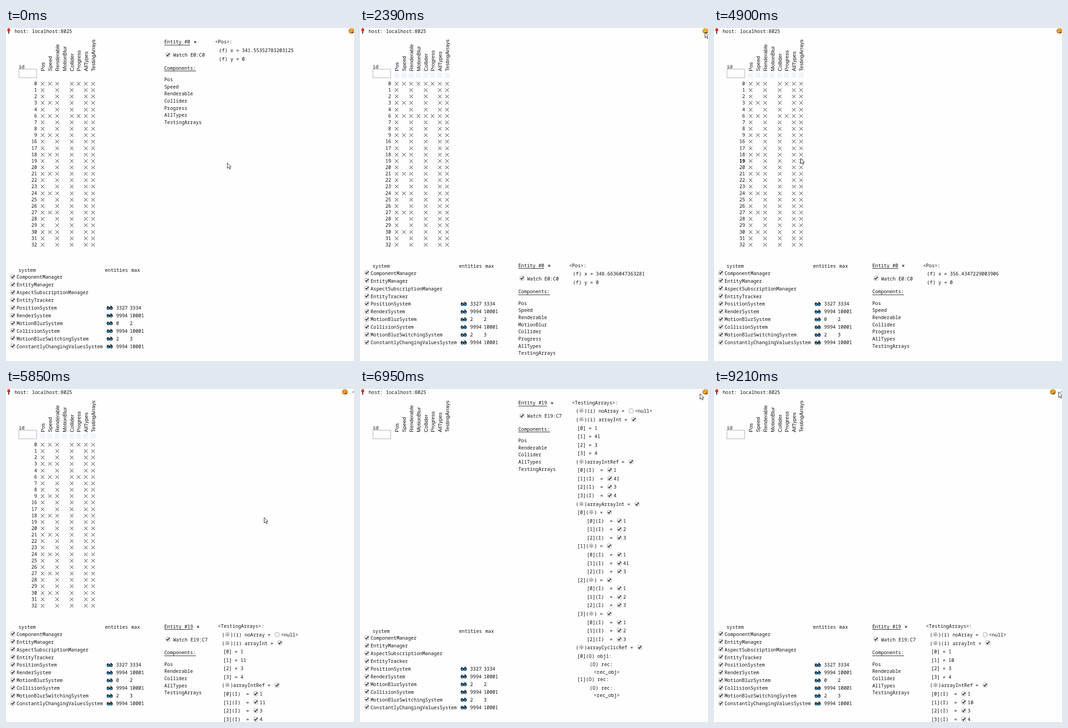
These frames come from a looping animation (765x732 px, 9.36 s). An HTML page with a canvas:

```html
<!DOCTYPE html>
<html lang="en">
<head>
<meta charset="utf-8">
<title>Entity inspector</title>
<style>
  html, body { margin: 0; width: 765px; height: 732px; overflow: hidden; background: #fefefe; }
  canvas { display: block; }
</style>
</head>
<body>
<canvas id="stage" width="765" height="732"></canvas>
<script>
const ctx = document.getElementById('stage').getContext('2d');
const LOOP = 9360;
const TICK = 78; // ms between refreshes
const CW = 6.325; // width of one monospace character
const MONO = '10.54px "Noto Sans Mono", monospace';
const MEDIUM = '500 ' + MONO;
const BOLD = '600 ' + MONO;
const SANS = '11.5px "Liberation Sans", Arial, sans-serif';
const CJK = '11.5px "Noto Sans CJK JP", "Noto Sans CJK", sans-serif';
const INK = '#111';

// Clicks and state changes
const TO_BOTTOM = 1390, PICK_ARRAYS = 4910, TO_SIDE = 6720, TO_BOTTOM_AGAIN = 8740;
const BLUR_OFF = 3560, BLUR_OFF_AGAIN = 8040;

// Key points: time, then values
const posKeys = [[0, 341.55352783203125], [1230, 345.27301025390625],
  [2390, 348.6636047363281], [3880, 353.2777099609375]];
const countKeys = [[5850, 111], [6950, 141], [9210, 210]];
const mouseKeys = [[120, 486, 296], [920, 757, 9], [3330, 758, 9], [3880, 242, 244], [4280, 190, 286],
  [4990, 190, 286], [5850, 567, 282], [6560, 747, 10], [7650, 747, 9], [8200, 757, 6]];

const columns = ['Pos', 'Speed', 'Renderable', 'MotionBlur', 'Collider', 'Progress', 'AllTypes', 'TestingArrays'];
const ids = Array.from({ length: 33 }, (_, i) => i).filter(i => i < 10 ? i !== 5 : i > 15);
const systems = [['ComponentManager'], ['EntityManager'], ['AspectSubscriptionManager'], ['EntityTracker'],
  ['PositionSystem', 3327, 3334], ['RenderSystem', 9994, 10001], ['MotionBlurSystem', 0, 2],
  ['CollisionSystem', 9994, 10001], ['MotionBlurSwitchingSystem', 2, 3],
  ['ConstantlyChangingValuesSystem', 9994, 10001]];

// Moves between key points in steps of about one tick, past the ends in a straight line
function interp(keys, t, axis = 1, ease = u => u) {
  let i = 0;
  while (i < keys.length - 2 && keys[i + 1][0] <= t) i++;
  const a = keys[i], b = keys[i + 1];
  const steps = Math.round((b[0] - a[0]) / TICK);
  const u = Math.floor((t - a[0]) / (b[0] - a[0]) * steps) / steps;
  return a[axis] + (b[axis] - a[axis]) * ease(u);
}
function smooth(u) {
  u = Math.min(1, Math.max(0, u));
  return u * u * (3 - 2 * u);
}

function has(id, col, blur) {
  if (col === 'Speed') return id % 3 === 0;
  if (col === 'Progress') return id === 0 || id === 6;
  if (col === 'MotionBlur') return blur && (id === 0 || id === 6);
  return true;
}

function stroke(points, color = INK, width = 1) {
  ctx.strokeStyle = color;
  ctx.lineWidth = width;
  ctx.beginPath();
  points.forEach(([x, y], i) => i ? ctx.lineTo(x, y) : ctx.moveTo(x, y));
  ctx.stroke();
}

function cross(x, y, r, width) {
  stroke([[x - r, y - r], [x + r, y + r]], INK, width);
  stroke([[x + r, y - r], [x - r, y + r]], INK, width);
}

function dot(x, y, rx, ry, color) {
  ctx.fillStyle = color;
  ctx.beginPath();
  ctx.ellipse(x, y, rx, ry, 0, 0, 7);
  ctx.fill();
}

function text(str, x, y, font = MONO) {
  ctx.font = font;
  ctx.fillStyle = INK;
  ctx.fillText(str, x, Math.round(y + 3.6));
}

function underlined(str, x, y) {
  text(str, x, y);
  ctx.fillRect(x, Math.round(y + 6), str.length * CW, 1);
}

function checkbox(x, y, on = true) {
  x = Math.round(x) - 5;
  y = Math.round(y) - 5;
  ctx.beginPath();
  ctx.roundRect(x + .5, y + .5, 9, 9, 2);
  ctx.fillStyle = '#f7f7f7';
  ctx.fill();
  ctx.strokeStyle = '#a4a4a4';
  ctx.lineWidth = 1;
  ctx.stroke();
  if (on) stroke([[x + 2.2, y + 5], [x + 4.2, y + 7.2], [x + 8.6, y + 1.8]], '#333', 1.9);
}

// Text line with wide reference marks and inline checkboxes
function run(str, x, y) {
  for (const part of str.split(/([※☑☐])/)) {
    if (part === '※') {
      text(part, x, y, CJK);
      x += 12;
    } else if (part === '☑' || part === '☐') {
      checkbox(x + 8.3, y - .5, part === '☑');
      x += 16.8;
    } else {
      text(part, x, y);
      x += part.length * CW;
    }
  }
}

function drawPin() {
  stroke([[6, 6], [6, 12.5]], '#3a2020', 2);
  dot(6, 4, 3.2, 3.6, '#d8281c');
  dot(5.2, 2.8, .9, .9, '#f4907c');
}

function drawPalette(x, hot) {
  dot(x, 6.5, 6.4, 5.8, '#8a4c0a');
  dot(x, 6.3, 5.6, 5, hot ? '#f2bc30' : '#eda32c');
  dot(x + 2, 9.6, 2, 1.6, '#8a4c0a');
  for (let i = 0; i < 4; i++) {
    const a = 2.5 + i * 1.1;
    dot(x + 3.2 * Math.cos(a), 6 + 2.6 * Math.sin(a), 1.1, 1, i % 2 ? '#c8701c' : '#f0c040');
  }
}

function drawGlasses(x, y) {
  stroke([[x - 5.5, y - 1], [x - 3, y - 4]], '#111', 1.6);
  stroke([[x + 1, y - 3.6], [x + 3, y - 4], [x + 5.5, y - 1]], '#111', 1.6);
  stroke([[x - 6.5, y - 1], [x + 6.5, y - 1]], '#111', 1.8);
  for (const s of [-3.2, 3.2]) {
    dot(x + s, y + 1, 3.3, 3, '#12202c');
    dot(x + s, y + 1.3, 2.2, 1.9, '#2f93cf');
  }
}

function drawCursor(x, y) {
  ctx.beginPath();
  [[0, 0], [0, 12], [2.8, 9.4], [4.8, 13.6], [6.8, 12.8], [5, 8.7], [8.6, 8.5]]
    .forEach(([a, b]) => ctx.lineTo(x + .5 + a, y + .5 + b));
  ctx.closePath();
  ctx.fillStyle = '#fff';
  ctx.fill();
  ctx.strokeStyle = '#222';
  ctx.lineWidth = 1;
  ctx.stroke();
}

function drawTable(rows, squares, blur, mx, my) {
  text('id', 28, 85);
  ctx.strokeStyle = '#a9a9a9';
  ctx.lineWidth = 1;
  ctx.strokeRect(28.5, 90.5, 39, 19);
  columns.forEach((name, c) => {
    const x = 81 + c * 15.88;
    if (squares) {
      ctx.fillStyle = '#eff5fe';
      ctx.fillRect(Math.round(x - 6), 98, 11, 12);
    }
    ctx.save();
    ctx.translate(Math.round(x + 4), 95);
    ctx.rotate(-Math.PI / 2);
    ctx.font = SANS;
    ctx.fillStyle = INK;
    ctx.fillText(name, 0, 0);
    ctx.restore();
  });
  if (!rows) return;
  ids.forEach((id, i) => {
    const y = Math.round(121.9 + i * 14.16);
    const hover = mx > 50 && mx < 300 && Math.abs(my + 4 - y) <= 7;
    text(String(id), 68.3 - String(id).length * CW, y, hover ? BOLD : MONO);
    columns.forEach((name, c) => {
      if (has(id, name, blur)) cross(Math.round(80 + c * 15.88) + .5, y + .5, 3.8, 1);
    });
  });
}

function drawSystems(dy, blur) {
  text('system', 27.5, 532 + dy);
  text('entities', 217.5, 532 + dy);
  text('max', 275.5, 532 + dy);
  systems.forEach(([name, count, max], i) => {
    const y = 547.5 + i * 16.97 + dy;
    checkbox(14.6, y - .8);
    text(name, 23.3, y);
    if (max === undefined) return;
    drawGlasses(228, y);
    text(String(name === 'MotionBlurSystem' && blur ? 2 : count), 242, y);
    text(String(max), 272, y);
  });
}

// Lines of the array view as [indent, text, height]
function arrayLines(n) {
  const items = (values, indent) => values.map((v, i) => [indent, `[${i}](I)  = ☑${v}`]);
  const nested = [0, 1, 2, 3].flatMap(i =>
    [[11.5, `[${i}](※) = ☑`], ...items([1, i === 1 ? n : 2, 3], 32.5)]);
  const cyclic = ['[0](O) obj1:', '[1](O) rec:'].flatMap(head =>
    [[11.5, head], [39, '(O) rec:', 16.3], [48, '<rec_obj>', 16.3]]);
  return [[0, '<TestingArrays>:'], [8.5, '(※)(i) noArray = ☐<null>'], [8.5, '(※)(i) arrayInt = ☑'],
    ...[1, n, 3, 4].map((v, i) => [11.5, `[${i}] = ${v}`]),
    [8.5, '(※)arrayIntRef = ☑'], ...items([1, n, 3, 4], 11.5),
    [8.5, '(※)arrayArrayInt = ☑'], ...nested,
    [8.5, '(※)arrayCyclicRef = ☑'], ...cyclic];
}

function drawPanel(t, dy, arrays, blur) {
  const id = arrays ? 19 : 0;
  const title = 'Entity #' + id;
  const right = 348 + title.length * CW;
  underlined(title, 348, 30.5 + dy);
  cross(right + 11, 31 + dy, 2.2, 1.1);
  checkbox(356.4, 58.8 + dy);
  text(arrays ? 'Watch E19:C7' : 'Watch E0:C0', 367.5, 59.5 + dy);
  underlined('Components:', 348, 88 + dy);
  columns.filter(name => has(id, name, blur)).forEach((name, i) => {
    const selected = name === (arrays ? 'TestingArrays' : 'Pos');
    text(name, 348, 113.4 + i * 15.66 + dy, selected ? MEDIUM : MONO);
  });

  const x = right + 54.8;
  if (arrays) {
    const n = Math.floor(interp(countKeys, t)) % 100;
    let y = 30.2 + dy;
    for (const [indent, line, height = 18.57] of arrayLines(n)) {
      run(line, x + indent, y);
      y += height;
    }
  } else {
    text('<Pos>:', x, 30.5 + dy);
    text('(f) x = ' + Math.fround(interp(posKeys, t)), x + 8.3, 49 + dy);
    text('(f) y = 0', x + 8.3, 68 + dy);
  }
}

function draw(t) {
  const bottom = t >= TO_BOTTOM && t < TO_SIDE || t >= TO_BOTTOM_AGAIN;
  const arrays = t >= PICK_ARRAYS;
  const rows = t < TO_SIDE;
  const blur = t >= TO_BOTTOM && t < BLUR_OFF || t >= TO_SIDE && t < BLUR_OFF_AGAIN;
  const scroll = bottom && arrays;
  const mx = Math.round(interp(mouseKeys, t, 1, smooth));
  const my = Math.round(interp(mouseKeys, t, 2, smooth));
  const paletteX = scroll ? 745 : 759.5;

  ctx.fillStyle = '#fefefe';
  ctx.fillRect(0, 0, 765, 732);
  drawPin();
  text('host: localhost:8025', 19, 7);
  drawTable(rows, rows && bottom, blur, mx, my);
  drawSystems(bottom ? -8.5 : 0, blur);
  drawPanel(t, bottom ? 491.6 : 0, arrays, blur);
  drawPalette(paletteX, Math.hypot(mx - paletteX, my - 6.5) < 6.5);
  if (scroll) {
    ctx.fillStyle = '#a3a3a3';
    ctx.beginPath();
    ctx.moveTo(760, 8);
    ctx.lineTo(764, 4);
    ctx.lineTo(768, 8);
    ctx.fill();
  }
  drawCursor(mx, my);
}

let start;
function frame(now) {
  start ??= now;
  draw((now - start) % LOOP);
  requestAnimationFrame(frame);
}
draw(0);
requestAnimationFrame(frame);
</script>
</body>
</html>
```
